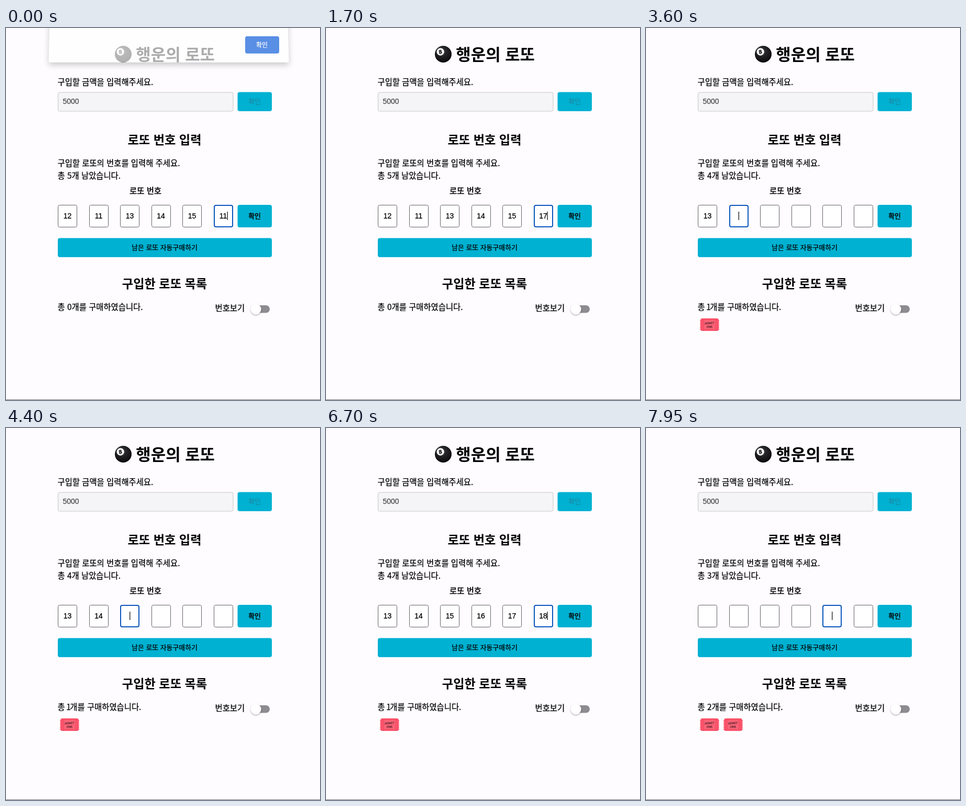
These frames come from a looping animation (600x711 px, 8000 ms). An HTML page:

```html
<!DOCTYPE html>
<html lang="ko">
<head>
<meta charset="utf-8">
<title>행운의 로또</title>
<style>
  html, body { margin: 0; width: 100%; height: 100%; overflow: hidden; background: #fefcff; }
  svg { display: block; width: 600px; height: 711px; }
  text {
    font: 15.4px "Noto Sans CJK KR", "Noto Sans CJK", sans-serif;
    fill: #000; stroke: #000; stroke-width: .25px; white-space: pre;
  }
  .mid { text-anchor: middle; }
  .h1 { font-size: 30.9px; font-weight: 700; stroke: none; }
  .h2 { font-size: 23.2px; font-weight: 700; stroke: none; }
  .label { stroke-width: .5px; }
  .btn { font-size: 12.9px; }
  .strong { stroke-width: .45px; }
  .num { font: 14px "Liberation Sans", sans-serif; }
  .teal { fill: #00b1d2; }
  .stub { font: 700 6px Roboto, sans-serif; fill: #5f2632; stroke: none; }
  #dialog { filter: drop-shadow(0 5px 6px rgba(0, 0, 0, .3)); }
</style>
</head>
<body>
<svg viewBox="0 0 600 711">
  <defs>
    <radialGradient id="shine" cx=".45" cy=".35" r=".65">
      <stop offset="0" stop-color="#3a3a3e"/>
      <stop offset=".6" stop-color="#1b1b1e"/>
      <stop offset="1" stop-color="#0b0b0d"/>
    </radialGradient>
    <filter id="soft" x="-50%" y="-50%" width="200%" height="200%">
      <feDropShadow dx="0" dy="1.5" stdDeviation="1.5" flood-opacity=".35"/>
    </filter>
    <g id="ticket">
      <rect x="104.5" y="555" width="34" height="24" rx="2.5" fill="#fa536a"/>
      <path d="M104.3 558V577M138.7 558V577" stroke="#fa536a" stroke-width="2" stroke-dasharray="2.4 1"/>
      <rect x="110.5" y="558" width="21.500" height="18" fill="#fb6377" stroke="#f04a62" stroke-width=".6"/>
      <g transform="rotate(-3 121 567)">
        <text class="stub mid" x="121.2" y="566.3">ADMIT</text>
        <text class="stub mid" x="121.2" y="573.3">ONE</text>
      </g>
    </g>
  </defs>

  <circle cx="224" cy="50" r="16" fill="url(#shine)"/>
  <circle cx="218.7" cy="45.5" r="7.2" fill="#f7f7f7"/>
  <text class="num mid" x="218.5" y="49.3" style="font-size:10.5px;font-weight:700" transform="rotate(-10 218.500 45.5)">8</text>
  <text class="h1" x="248.3" y="61.7">행운의 로또</text>

  <text x="98.5" y="109.3">구입할 금액을 입력해주세요.</text>
  <rect x="99.5" y="123" width="334.5" height="36" rx="3" fill="#f5f4f6" stroke="#c6c5c9"/>
  <text class="num" x="108.5" y="145.2" style="fill:#48474a;stroke:#48474a">5000</text>
  <rect class="teal" x="442.5" y="122.5" width="65.5" height="36.5" rx="4"/>
  <text class="btn mid" x="475" y="145.3" style="fill:#20819a;stroke:none">확인</text>

  <text class="h2 mid" x="303" y="221.7">로또 번호 입력</text>
  <text x="98.5" y="264">구입할 로또의 번호를 입력해 주세요.</text>
  <text id="left" x="98.5" y="288"></text>
  <text class="label mid" x="266.5" y="317">로또 번호</text>
  <g id="fields"></g>
  <path id="caret" stroke="#000" stroke-width="1.2"/>
  <rect class="teal" x="442.5" y="338" width="65.5" height="43" rx="4"/>
  <text class="btn strong mid" x="475" y="364">확인</text>
  <rect class="teal" x="99" y="401.5" width="409" height="36.5" rx="4"/>
  <text class="btn mid" x="303" y="424">남은 로또 자동구매하기</text>

  <text class="h2 mid" x="303" y="496.7">구입한 로또 목록</text>
  <text id="bought" x="98.5" y="539"></text>
  <text x="399.5" y="541">번호보기</text>
  <rect x="470" y="530" width="34" height="14.5" rx="7.2" fill="#8d8b90"/>
  <circle cx="477.5" cy="537.5" r="10" fill="#fff" filter="url(#soft)"/>
  <g id="tickets">
    <use href="#ticket"/>
    <use href="#ticket" x="45"/>
  </g>
  <path d="M0 710.5H600" stroke="#77767a"/>

  <g id="dialog">
    <path d="M84.5 -60L81.5 66H540.5L537.5 -60Z" fill="#fff"/>
    <rect x="457" y="16" width="65" height="33" rx="4" fill="#0a5cd8"/>
    <text class="mid" x="489" y="37" style="font-size:12px;fill:#fff;stroke:#fff">확인</text>
  </g>
</svg>
<script>
const LOOP = 8000, FIELDS = 6, DIGIT = 7.79, BLINK = 500;
const START = ["12", "11", "13", "14", "15", "11"];

// Keys: digits type, "<" deletes, ">" and "^" move the focus, "!" submits.
const KEYS = [
  [950, "<"], [1300, "7"], [1950, "!"],
  [2150, "^"], [2250, "^"], [2350, "^"], [2450, "^"], [2550, "^"],
  [2900, "1"], [3100, "3"], [3550, ">"],
  [3700, "1"], [3900, "4"], [4200, ">"],
  [4650, "1"], [4800, "5"], [5000, ">"],
  [5100, "1"], [5250, "6"], [5450, ">"],
  [5750, "1"], [5950, "7"], [6150, ">"],
  [6300, "1"], [6500, "8"], [6800, "!"], [7800, "^"]
];

const $ = id => document.getElementById(id);
const center = i => 117.5 + i * 59.5;

function make(name, attrs = {}) {
  const el = document.createElementNS("http://www.w3.org/2000/svg", name);
  setAll(el, attrs);
  $("fields").append(el);
  return el;
}

function setAll(el, attrs) {
  for (const key in attrs) el.setAttribute(key, attrs[key]);
}

const fields = START.map((_, i) => ({
  box: make("rect", { rx: 3, fill: "#fff" }),
  text: make("text", { class: "num mid", x: center(i), y: 364 })
}));

function stateAt(time) {
  const state = { values: [...START], focus: FIELDS - 1, bought: 0, touched: 0 };
  for (const [at, key] of KEYS) {
    if (at > time) break;
    const { values, focus } = state;
    state.touched = at;
    if (key === ">") state.focus++;
    else if (key === "^") state.focus--;
    else if (key === "<") values[focus] = values[focus].slice(0, -1);
    else if (key === "!") {
      values.fill("");
      state.bought++;
    } else values[focus] += key;
  }
  return state;
}

// The border lies inside the 37 by 43 box, whatever its width.
function drawBox(box, i, active) {
  const line = active ? 2 : 1;
  setAll(box, {
    x: Math.round(center(i) - 18.5) + line / 2,
    y: 338 + line / 2,
    width: 37 - line,
    height: 43 - line,
    stroke: active ? "#0b57bd" : "#626165",
    "stroke-width": line
  });
}

function render(time) {
  const { values, focus, bought, touched } = stateAt(time);
  fields.forEach(({ box, text }, i) => {
    drawBox(box, i, i === focus);
    text.textContent = values[i];
  });

  const x = center(focus) + values[focus].length * DIGIT / 2 + .3;
  $("caret").setAttribute("d", `M${x} 351V367`);
  $("caret").style.opacity = (time - touched) % (2 * BLINK) < BLINK ? 1 : 0;

  $("left").textContent = `총 ${5 - bought}개 남았습니다.`;
  const kern = bought === 1 ? -1.6 : 0;
  $("bought").innerHTML =
    `총 <tspan dx="${kern}">${bought}</tspan><tspan dx="${kern}">개를 구매하였습니다.</tspan>`;
  [...$("tickets").children].forEach((ticket, i) => {
    ticket.style.display = i < bought ? "" : "none";
  });

  const gone = Math.min(time / 180, 1);
  $("dialog").style.opacity = .68 * (1 - gone);
  $("dialog").style.transform = `translateY(${-45 * gone}px)`;
}

const begin = performance.now();
function tick() {
  render((performance.now() - begin) % LOOP);
  requestAnimationFrame(tick);
}
tick();
</script>
</body>
</html>
```
